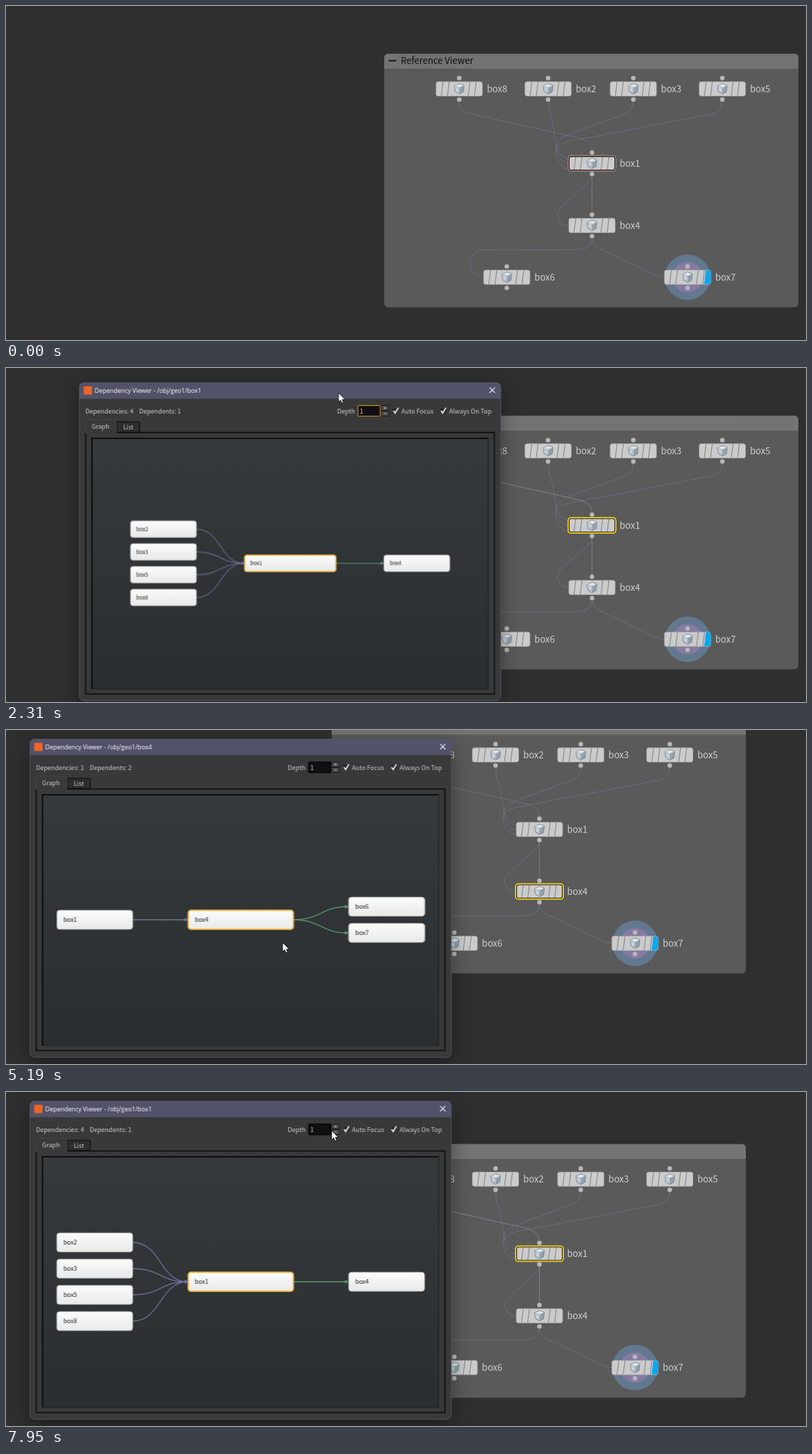
An HTML page for the animation above (8 s loop, 1157 by 484 pixels).

```html
<!DOCTYPE html>
<html lang="en">
<head>
<meta charset="utf-8">
<title>Dependency viewer</title>
<style>
html, body { margin: 0; width: 100%; height: 100%; overflow: hidden; background: #2f2f2f; }
svg { display: block; width: 100%; height: 100%; }
text { font-family: "Noto Sans CJK JP", "Noto Sans CJK SC", "Noto Sans CJK", "Open Sans", sans-serif; white-space: pre; }
.label { font-size: 13.1px; fill: #cfcfcf; }
.ui { font-size: 9.05px; fill: #cdcdcd; }
.item { font-size: 8.7px; fill: #222; }
.title { font: 8.95px "Open Sans", "Noto Sans", sans-serif; fill: #fff; }
.wire { fill: none; stroke: #8783b4; stroke-width: .9; stroke-dasharray: 1.4 1.6; }
.grey { stroke: #a2a2a2; }
.edge { fill: none; stroke-width: 1.3; }

#net, #win, #pop, #cursor, #sel1, #sel4, #ring, #lit, #focus, #caret,
.view, .press { animation: 8s linear infinite; }
#net { animation-name: pan; }
#win { animation-name: drag; }
#pop { animation-name: pop; transform-origin: 305px 230.5px; }
#cursor { animation-name: point; }
#ring { animation-name: ring; }
#lit { animation-name: lit; }
#sel1, #sel4, #focus, #caret, .view, .press { animation-timing-function: step-end; }
#sel1 { animation-name: sel1; }
#sel4 { animation-name: sel4; }
#focus { animation-name: focus; }
#caret { animation-name: caret; }
#viewA { animation-name: viewA; }
#viewB { animation-name: viewB; }
#viewC { animation-name: viewC; }
#viewA .press { animation-name: pressA; }
#viewB .press { animation-name: pressB; }

@keyframes pan {
  0%, 51% { transform: translate(0, 0); }
  52.125% { transform: translate(-46px, -51px); }
  52.875%, 88.875% { transform: translate(-76px, -84px); }
  89.625% { transform: translate(-76px, -55px); }
  90.375%, 100% { transform: translate(-76px, 6.3px); }
}
@keyframes drag {
  0%, 25.3% { transform: translate(295.5px, -49px); }
  28.875% { transform: translate(106px, 21px); animation-timing-function: ease-out; }
  35.625% { transform: translate(36px, 13px); }
  36.375%, 100% { transform: translate(34.3px, 13px); }
}
@keyframes pop {
  0%, 14.49% { opacity: 0; transform: scale(.91); }
  14.5% { opacity: .6; transform: scale(.915); }
  15.25% { opacity: .88; transform: scale(.943); }
  16% { opacity: .97; transform: scale(.973); }
  17.5%, 100% { opacity: 1; transform: scale(1); }
}
@keyframes point {
  0%, 14.49% { opacity: 0; transform: translate(764px, 248px); }
  14.5%, 15.5% { opacity: 1; transform: translate(764px, 248px); animation-timing-function: ease-in-out; }
  22%, 25.3% { transform: translate(671px, -33px); }
  28.875% { transform: translate(481px, 36px); animation-timing-function: ease-out; }
  35.625%, 36.375% { transform: translate(410px, 30px); animation-timing-function: ease-in-out; }
  46.125% { transform: translate(444px, 287px); animation-timing-function: ease-out; }
  49.125%, 55% { transform: translate(523px, 275px); animation-timing-function: ease-in-out; }
  64.875%, 66.5% { transform: translate(400px, 308px); animation-timing-function: ease-in-out; }
  76.875% { transform: translate(247px, 286px); }
  77.625%, 79.5% { transform: translate(266px, 287px); animation-timing-function: ease-in-out; }
  88%, 90.5% { transform: translate(130px, 278px); animation-timing-function: ease-in-out; }
  99.3%, 100% { opacity: 1; transform: translate(471px, 56px); }
}
@keyframes ring {
  0%, 5% { stroke: #cf9288; stroke-width: 1; }
  8.25%, 100% { stroke: #f4d01c; stroke-width: 1.8; }
}
@keyframes lit {
  0%, 5% { opacity: 0; }
  8.25%, 51.25% { opacity: 1; }
  51.26%, 88.87% { opacity: 0; }
  88.88%, 100% { opacity: 1; }
}
@keyframes sel1 { 0% { opacity: 1; } 51.25% { opacity: 0; } 88.875% { opacity: 1; } }
@keyframes sel4 { 0% { opacity: 0; } 51.25% { opacity: 1; } 88.875%, 100% { opacity: 0; } }
@keyframes focus { 0% { opacity: 1; } 51.375%, 100% { opacity: 0; } }
@keyframes caret {
  0% { opacity: 1; } 25.875% { opacity: 0; } 32.25% { opacity: 1; }
  38.875% { opacity: 0; } 45.5% { opacity: 1; } 51.375%, 100% { opacity: 0; }
}
@keyframes viewA { 0% { opacity: 1; } 53.625%, 100% { opacity: 0; } }
@keyframes viewB { 0% { opacity: 0; } 53.625% { opacity: 1; } 91.125%, 100% { opacity: 0; } }
@keyframes viewC { 0% { opacity: 0; } 91.125%, 100% { opacity: 1; } }
@keyframes pressA { 0% { opacity: 0; } 51.375%, 100% { opacity: 1; } }
@keyframes pressB { 0% { opacity: 0; } 88.875%, 100% { opacity: 1; } }
</style>
</head>
<body>
<svg id="stage" viewBox="0 0 1157 484" preserveAspectRatio="none"></svg>
<script>
const rect = (x, y, w, h, r, attrs) =>
  `<rect x="${x}" y="${y}" width="${w}" height="${h}" rx="${r}" ${attrs}/>`;
const text = (x, y, kind, s) => `<text x="${x}" y="${y}" class="${kind}">${s}</text>`;
const path = (d, attrs) => `<path d="${d}" ${attrs}/>`;
const wire = (d, kind = '') => path(d, `class="wire ${kind}"`);

// Network editor
const cube =
  path('M-7,-4.5L0.5,-7.5L7,-5L6,4.5L0,7.5L-6,4Z', 'fill="#93a1ae" stroke="#6c7986" stroke-width=".8" stroke-linejoin="round"') +
  path('M-6.6,-4.4L0.5,-7L6.6,-4.8L0.4,-2Z', 'fill="#dfe6eb"') +
  path('M-6.6,-4.4L0.4,-2L0,7L-5.7,3.8Z', 'fill="#b9c5cf"') +
  path('M-4.5,-.8L-1.6,.4L-1.7,3.6L-4.2,2.3Z', 'fill="#d0d9e0"');

function netNode(name, x, y, flag) {
  const dots = [-15.5, 15.5].map(d => `<circle cy="${d}" r="3.3" fill="#b7b7b7"/>`).join('');
  const stripes = [-25, -16, 14, 23].map(s => `M${s + 1.5},-10L${s - 1},10`).join('');
  const halo = flag ? '<circle r="33" fill="#62788f"/><circle r="22" fill="#877aa2"/>' : '';
  const cap = flag ? path('M26.5,-10H31Q33.5,-10 33.5,-7V7Q33.5,10 31,10H24Z', 'fill="#08a9f2"') : '';
  return `<g transform="translate(${x} ${y})">${halo}${dots}` +
    rect(-33.5, -10.3, 67, 20.8, 3, 'fill="#cbcbcb" stroke="#a8a8a8" stroke-width=".6"') +
    path(stripes, 'stroke="#777" stroke-width=".9"') + cap + cube +
    text(40, 5, 'label', name) + '</g>';
}

const ring = (x, y, attrs) =>
  rect(x - 33.2, y - 10, 66.4, 20, 3, 'fill="none" stroke="#15120c" stroke-width="1.4"') +
  rect(x - 34.4, y - 11.2, 68.8, 22.4, 4, `fill="none" ${attrs}`);

const boxes = [['box8', 655.5, 120], ['box2', 784, 120], ['box3', 907.3, 120], ['box5', 1036, 120],
  ['box1', 847.5, 228], ['box4', 847.5, 318], ['box6', 724.3, 393], ['box7', 985.7, 393, true]];
const mainWire = 'M655.5,139C655.5,150 662,154 672,156L828,191C842,195 847.5,201 847.5,209';
const downWire = 'M847.5,247V299';

const network = '<g id="net">' +
  rect(547, 69.3, 599, 367.5, 6, 'fill="#5a5a5a"') +
  path('M547,90V75Q547,69.3 553,69.3H1140Q1146,69.3 1146,75V90Z', 'fill="#737373"') +
  path('M547,90H1146', 'stroke="#818181" stroke-width=".8"') +
  path('M553.5,79.3H564.5', 'stroke="#0c0c0c" stroke-width="1.8"') +
  path('M568,70V90', 'stroke="#6a6a6a" stroke-width=".6"') +
  `<text x="571" y="84" class="label" style="fill:#0c0c0c">Reference Viewer</text>` +
  boxes.slice(7).map(b => netNode(...b)).join('') +
  wire(mainWire) +
  wire('M784,139C785,150 788,160 791,172L796,200C798,212 804,219 813,221') +
  wire('M907,139C907,150 900,155 891,158L812,187C796,193 793,205 797,213C800,222 806,227 813,228') +
  wire('M1036,139C1036,150 1028,155 1018,157L815,196C798,199 792,209 796,219C799,229 806,235 813,236') +
  wire(downWire, 'grey') +
  wire('M847.5,247C846,254 838,260 832,265L806,289C798,296 796,303 799,309C802,316 807,318 813,318') +
  wire('M847.5,338C847,348 838,353 826,353L690,353.5C676,354 671,365 671,374C672,385 680,392 690,393') +
  wire('M847.5,338C848,346 856,351 866,355L935,388C941,391 947,393 952,393') +
  `<g id="lit">${wire(mainWire, 'grey')}${wire(downWire, 'grey')}</g>` +
  boxes.slice(0, 7).map(b => netNode(...b)).join('') +
  `<g id="sel1">${ring(847.5, 228, 'id="ring"')}</g>` +
  `<g id="sel4">${ring(847.5, 318, 'stroke="#f4d01c" stroke-width="1.8"')}</g></g>`;

// Dependency graph, centred on y = 262
const MID = 262, BLUE = '#6d739c', GREEN = '#5c9673';
const rows = n => [...Array(n).keys()].map(i => MID + (i - (n - 1) / 2) * 38);

function item(name, x, y, w, attrs) {
  return rect(x, y - 13.8, w, 27.6, 4, `fill="url(#paper)" ${attrs}`) + text(x + 9.5, y + 3.4, 'item', name);
}
function edge(x1, y1, x2, y2, color) {
  const m = (x1 + x2) / 2;
  return path(`M${x1},${y1}C${m},${y1} ${m},${y2} ${x2 - 2},${y2}`, `class="edge" stroke="${color}"`) +
    path(`M${x2 - 5.5},${y2 - 2.8}L${x2},${y2}L${x2 - 5.5},${y2 + 2.8}Z`, `fill="${color}"`);
}
function view(id, name, ins, outs, scale, pressed) {
  const plain = 'stroke="#c4c4c4" stroke-width=".8"';
  let edges = '', items = '', glow = '';
  const column = (names, x, link) => rows(names.length).forEach((y, i) => {
    edges += link(y);
    items += item(names[i], x, y, 109.7, plain);
    if (names[i] === pressed)
      glow = rect(x, y - 13.8, 109.7, 27.6, 4, 'class="press" fill="none" stroke="#569bf5" stroke-width="2.4"');
  });
  column(ins, 39.7, y => edge(149.5, y, 230, MID, BLUE));
  column(outs, 461.8, y => edge(382, MID, 461.8, y, GREEN));
  items += item(name, 229.8, MID, 152, 'stroke="#efb548" stroke-width="2"');
  return `<g id="${id}" class="view">` +
    text(22.5, 15, 'title', `Dependency Viewer - /obj/geo1/${name}`) +
    text(9, 44.7, 'ui', `Dependencies: ${ins.length}`) +
    text(86.7, 44.7, 'ui', `Dependents: ${outs.length}`) +
    `<g transform="translate(305.3 ${MID}) scale(${scale}) translate(-305.8 ${-MID})">${edges}${items}${glow}</g></g>`;
}

// Floating window
const check = x => rect(x - 4.5, 37, 8, 8, 1, 'fill="#2b2b2b"') +
  path(`M${x - 3.5},41L${x - 1},44.3L${x + 3.6},36.6`, 'fill="none" stroke="#eee" stroke-width="1.8"');
const spin = (y, sign) => rect(436.5, y, 11.5, 7, 1, 'fill="#4a4a4a" stroke="#111" stroke-width=".8"') +
  path(sign, 'stroke="#bbb" stroke-width=".9"');
const four = ['box2', 'box3', 'box5', 'box8'];

const panel = '<g id="win"><g id="pop">' +
  rect(0, 0, 610, 461.5, 7, 'fill="#393939" style="filter:drop-shadow(0 8px 14px rgba(0,0,0,.38))"') +
  path('M0,23.5V7Q0,0 7,0H603Q610,0 610,7V23.5Z', 'fill="#52536a"') +
  rect(.3, .3, 609.4, 460.9, 7, 'fill="none" stroke="#595a69" stroke-width=".9"') +
  rect(6.5, 5.5, 12, 12, 1, 'fill="#ee6526"') +
  path('M593.5,7.2L601.3,15M601.3,7.2L593.5,15', 'stroke="#f2f2f2" stroke-width="1.1"') +
  text(373.3, 44.7, 'ui', 'Depth') +
  rect(403.3, 33.3, 32, 15.6, 1, 'fill="#101010" stroke="#050505" stroke-width="1.2"') +
  rect(403.3, 33.3, 32, 15.6, 1, 'id="focus" fill="none" stroke="#c98a3c" stroke-width="1.2"') +
  text(405.8, 44.7, 'ui', '1') +
  '<g id="caret">' + path('M405.8,35V47.3', 'stroke="#e8e8e8" stroke-width="1"') + '</g>' +
  spin(33.5, 'M440.5,37H444M442.2,35.3V38.7') + spin(41.5, 'M440.5,45H444') +
  check(458) + text(466, 44.7, 'ui', 'Auto Focus') +
  check(526.7) + text(535, 44.7, 'ui', 'Always On Top') +
  rect(9.5, 72.5, 591, 379, 0, 'fill="none" stroke="#0b0b0b" stroke-width="1.6"') +
  path('M54,72V57H86Q87.5,57 87.5,59V72Z', 'fill="#2d2d2d" stroke="#0b0b0b" stroke-width="1.2"') +
  path('M9.5,74V56Q9.5,54 11.5,54H51.5Q53.5,54 53.5,56V74', 'fill="#393939" stroke="#4a4a4a" stroke-width=".9"') +
  text(18, 67.2, 'ui', 'Graph') + text(63.7, 67.7, 'ui', 'List') +
  rect(18.5, 80.5, 573, 363.5, 0, 'fill="url(#canvas)" stroke="#1b1d1e" stroke-width="1"') +
  path('M18.5,444V80.8H591.5', 'fill="none" stroke="#070707" stroke-width="1.8"') +
  view('viewA', 'box1', four, ['box4'], .868, 'box4') +
  view('viewB', 'box4', ['box1'], ['box6', 'box7'], 1, 'box1') +
  view('viewC', 'box1', four, ['box4'], 1) +
  '</g></g>';

const gradient = (id, a, b) => `<linearGradient id="${id}" x2="0" y2="1">` +
  `<stop stop-color="${a}"/><stop offset="1" stop-color="${b}"/></linearGradient>`;

document.getElementById('stage').innerHTML =
  `<defs>${gradient('paper', '#fcfcfc', '#e9e9e9')}${gradient('canvas', '#363a3c', '#2a2e30')}</defs>` +
  network + panel +
  '<g id="cursor">' +
  path('M0,0V13.3L3,10.6L5,15L7.3,14L5.4,9.8H9.6Z', 'fill="#fff" stroke="#111" stroke-width=".9" stroke-linejoin="round"') +
  '</g>';
</script>
</body>
</html>
```
